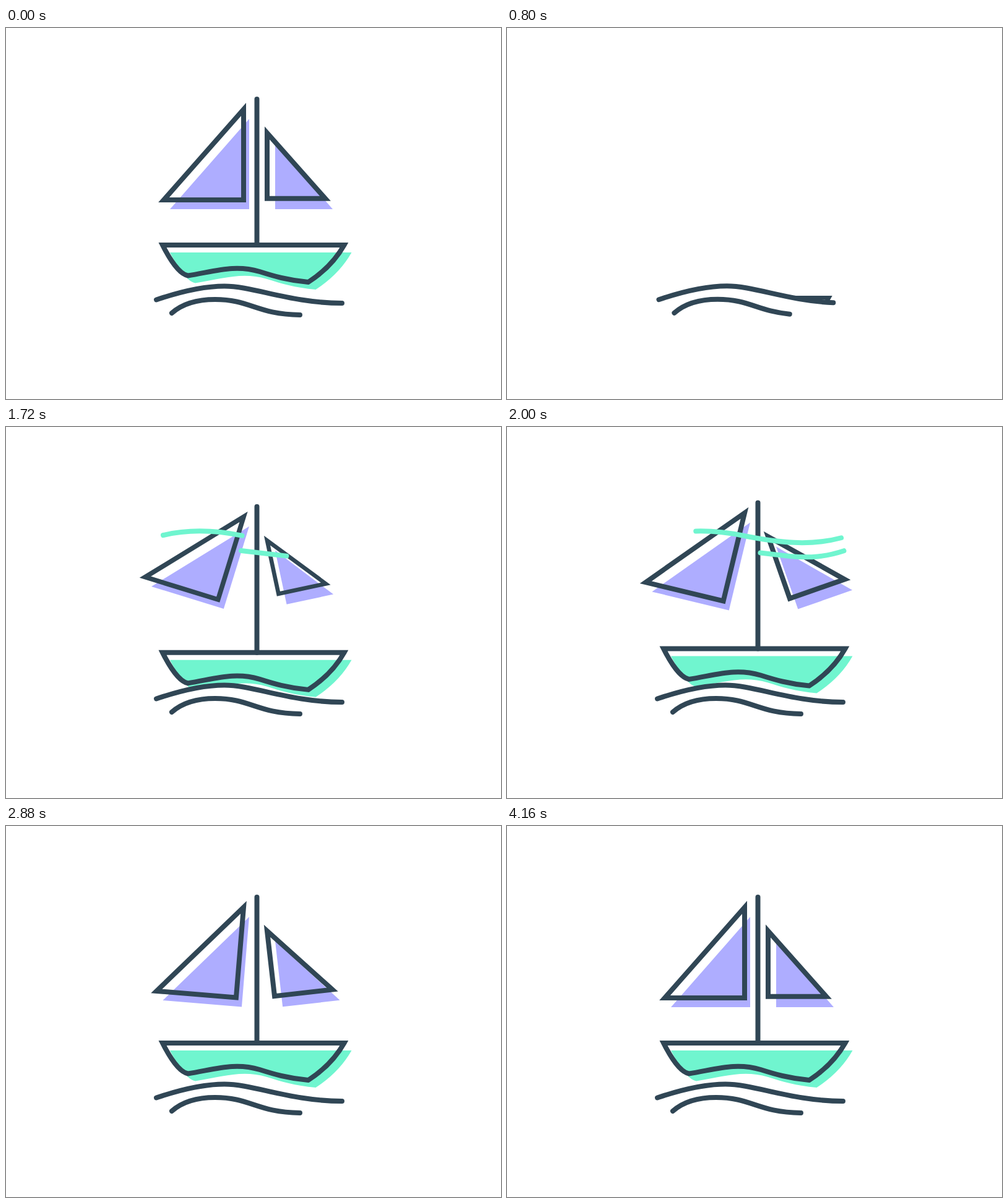
These frames come from a looping animation (800 by 600 pixels, 4200 ms). An HTML page:

```html
<!DOCTYPE html>
<html lang="en">
<head>
<meta charset="utf-8">
<title>Sailing boat</title>
<style>
  html, body { margin: 0; width: 100%; height: 100%; overflow: hidden; background: #fff; }
  svg { display: block; width: 100%; height: 100%; }
  .line { fill: none; stroke: #304655; stroke-width: 8; }
  .round { stroke-linecap: round; }
  .sail { fill: #aeadff; }
  .green { fill: #70f5cf; }
  .wind { fill: none; stroke: #70f5cf; stroke-width: 8; stroke-linecap: round; }
</style>
</head>
<body>
<svg viewBox="0 0 800 600">
  <defs>
    <clipPath id="aboveWater">
      <path d="M243 439.5C280 427 318 417.5 353 417.5C400 417.5 460 445 543 445H800V0H0V439.5Z"/>
    </clipPath>
    <path id="hullShape" d="M253 351H546.5Q527 386 488.5 411C455 408 432 401 410 394C370 382 340 393 294 400.5C280 398 264 373 253 351Z"/>
  </defs>
  <g clip-path="url(#aboveWater)">
    <g id="hull">
      <use href="#hullShape" class="green" x="12" y="12"/>
      <use href="#hullShape" class="line"/>
    </g>
    <line id="mast" class="line round" x1="405.5" x2="405.5"/>
  </g>
  <g id="sails">
    <path id="leftFill" class="sail" d="M0 0V146H-128Z"/>
    <path id="leftLine" class="line" d="M0 0V146.5H-129Z"/>
    <path id="rightFill" class="sail" d="M0 0V107H93Z"/>
    <path id="rightLine" class="line" d="M0 0V106H94Z"/>
  </g>
  <g id="waves">
    <path id="wave1" class="line round" pathLength="1" d="M243 439.5C280 427 318 417.5 353 417.5C400 417.5 460 445 543 445"/>
    <path id="wave2" class="line round" pathLength="1" d="M268 461C285 446 310 439 338 439C395 439 405 463 475 464"/>
  </g>
  <path id="wind1" class="wind" pathLength="1" d="M254 175C296 165 340 167 383 176C440 187 490 193 541 179"/>
  <path id="wind2" class="wind" pathLength="1" d="M380 200C405 203 430 206 457 209C490 212 515 210 545 200"/>
</svg>
<script>
const LOOP = 4200, STEP = 40;
const el = id => document.getElementById(id);
const clamp = x => Math.min(1, Math.max(0, x));
const smooth = p => (1 - Math.cos(Math.PI * p)) / 2;
const easeOut = p => 1 - (1 - p) ** 2;
const span = (t, from, to) => clamp((t - from) / (to - from));

// Eases through [time, value] keys.
function track(t, keys) {
  let i = 1;
  while (i < keys.length - 1 && t > keys[i][0]) i++;
  const [t0, v0] = keys[i - 1], [t1, v1] = keys[i];
  return v0 + (v1 - v0) * smooth(span(t, t0, t1));
}

const BOB = [[600, 108], [1290, -9.5], [1770, 14.5], [2240, 0]];
const SWING = [[1320, 0], [1850, 20], [2390, -16], [2810, 6.8], [3040, -3], [3290, 0]];
const DRIFT_X = [[40, -40], [820, 2.5], [1160, 0]];
const DRIFT_Y = [[40, 46], [700, -0.3], [1160, 0]];

function trim(id, start, end) {
  const style = el(id).style;
  style.display = end - start > 0.0005 ? '' : 'none';
  style.strokeDasharray = `${end - start} 2`;
  style.strokeDashoffset = -start;
}

function place(id, x, y, angle, scale) {
  el(id).setAttribute('transform', `translate(${x} ${y}) rotate(${angle}) scale(${scale})`);
}

function sail(name, t, side, [x, y], [fillX, fillY]) {
  const angle = side * track(t, SWING);
  const scale = easeOut(span(t, 1326, 1826));
  place(name + 'Line', x, y, angle, scale);
  place(name + 'Fill', fillX, fillY, angle, scale);
}

function draw(t) {
  const bob = track(t, BOB);
  const hullScale = track(t, [[600, 0.64], [1000, 1]]);
  el('hull').setAttribute('transform',
    `translate(400 ${351 + bob}) scale(${hullScale}) translate(-400 -351)`);

  const mast = el('mast');
  mast.setAttribute('y1', 351 + bob);
  mast.setAttribute('y2', 351 + bob - 236 * easeOut(span(t, 840, 1610)));
  mast.style.display = t > 840 ? '' : 'none';

  const sails = el('sails');
  sails.style.display = t > 1326 ? '' : 'none';
  sails.setAttribute('transform', `translate(0 ${bob})`);
  sail('left', t, 1, [384, 131.5], [393, 147]);
  sail('right', t - 100, -1, [422, 169.8], [435, 186]);

  el('waves').setAttribute('transform', `translate(${track(t, DRIFT_X)} ${track(t, DRIFT_Y)})`);
  trim('wave1', 0, smooth(span(t, 40, 940)));
  trim('wave2', 0, smooth(span(t, 40, 990)));

  const head = smooth(span(t, 1460, 2020)), tail = smooth(span(t, 1850, 2390));
  trim('wind1', tail, head);
  trim('wind2', tail, head);
}

const began = performance.now();
function tick() {
  const now = (performance.now() - began) % LOOP;
  const t = Math.floor(now / STEP) * STEP;
  draw(t < STEP ? LOOP : t); // the loop opens on the finished boat
  requestAnimationFrame(tick);
}
tick();
</script>
</body>
</html>
```
